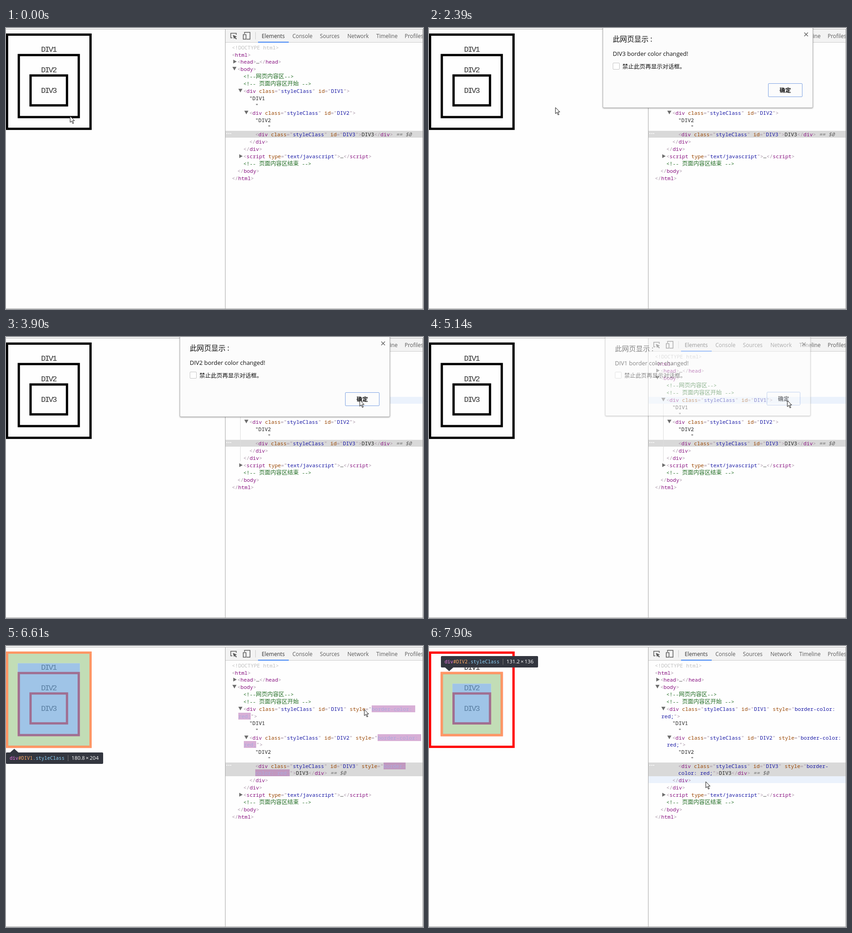
An HTML page that plays this animation: 910x615 px, repeating every 8000 ms.

```html
<!DOCTYPE html>
<html lang="zh-CN">
<head>
<meta charset="utf-8">
<style>
  html, body { margin: 0; width: 100%; height: 100%; overflow: hidden; background: #fefefe; }
  #stage { position: relative; width: 910px; height: 615px; overflow: hidden; }
  #stage div, #stage svg { position: absolute; box-sizing: border-box; }
  .ui { font: 11.7px/16px "Open Sans", "Noto Sans CJK SC", sans-serif; white-space: pre; }

  /* Page */
  #page rect { fill: none; }
  #page .edge { stroke: var(--edge); }
  #page .border { stroke: rgba(255, 229, 153, .66); }
  #page .padding { stroke: rgba(147, 196, 125, .55); }
  #page .content { fill: rgba(111, 168, 220, .66); }
  .label { left: 76.5px; font: 17px/18px "Liberation Mono", monospace; letter-spacing: -1.95px; color: #333; }
  #tip { width: 212px; height: 25px; border-radius: 2px; background: #33363f; color: #fff; }
  #tip .path { left: 8px; top: 4px; font: 10.5px/16px "Noto Sans Mono", monospace; white-space: pre; color: #ee78e6; }
  #tip .path b { font-weight: 400; color: #ffab66; }
  #tip .path i { font-style: normal; color: #8ed3fb; }
  #tip .bar { left: 135px; top: 6px; width: 1px; height: 13px; background: #777; }
  #tip .size { left: 143px; top: 4px; font-size: 11.4px; }
  #tip .size span { padding: 0 2px; }
  #notch { left: 9px; width: 18px; height: 8px; background: #33363f; }
  .above #notch { top: 25px; clip-path: polygon(0 0, 100% 0, 50% 100%); }
  .below #notch { top: -8px; clip-path: polygon(50% 0, 100% 100%, 0 100%); }

  /* Inspector */
  #bar { left: 479px; top: 3px; width: 431px; height: 29px; background: #f3f3f3; border-bottom: 1px solid #ccc; }
  .tab { top: 9px; color: #5a5a5a; }
  .tab.on { color: #333; }
  .row { left: 479px; width: 430px; }
  #hover { background: #ebf2fc; }
  #pick { background: #d9d9d9; }
  #dots { left: 1px; top: -1px; font: bold 11px/15px "DejaVu Sans", sans-serif; color: #fff; }
  #guide { left: 511px; top: 146px; width: 1px; height: 126px; background: #ddd; }
  .line { height: 16px; font: 11.38px/16px "Noto Sans Mono", monospace; white-space: pre; color: #222; }
  .line.down::before, .line.right::before { content: ""; position: absolute; background: #6e6e6e; }
  .line.down::before { left: -11px; top: 3px; width: 9px; height: 8px; clip-path: polygon(0 0, 100% 0, 50% 100%); }
  .line.right::before { left: -9.5px; top: 3px; width: 8px; height: 9px; clip-path: polygon(0 0, 100% 50%, 0 100%); }
  .b { color: #a894a6; } .n { color: #881280; } .k { color: #994500; } .v { color: #1a1aa6; }
  .c { color: #236e25; } .d { color: #c0c0c0; } .e { color: #666; font-style: italic; }
  .zh { font: 12.4px/1 "Noto Sans CJK SC", sans-serif; }
  .m { background: var(--flash); color: var(--ink); }

  /* Dialog */
  #dialog {
    left: 379px; top: -4px; width: 459px; height: 179px; color: #111;
    background: #fcfcfc; border: 1px solid #b4b4b4; border-radius: 3px; box-shadow: 0 1px 3px rgba(0, 0, 0, .35);
  }
  #title { left: 21px; top: 15px; font-size: 15.6px; line-height: 24px; }
  #title span { padding-left: 4px; }
  #msg { left: 21px; top: 51px; font-size: 12.95px; }
  #check { left: 21px; top: 79px; width: 15px; height: 15px; border: 1px solid #c4c4c4; border-radius: 2px; background: #fff; }
  #mute { left: 42px; top: 79px; font: 12.5px/16px "Noto Sans CJK SC", sans-serif; }
  #ok {
    left: 360px; top: 124px; width: 75px; height: 30px; border: 1px solid #7ea3e3; border-radius: 2px;
    font: bold 12.4px/29px "Noto Sans CJK SC", sans-serif; text-align: center;
  }
</style>
</head>
<body>
<div id="stage">
  <svg id="page" style="left:0;top:0" width="240" height="240">
    <g transform="translate(-.2 12) scale(1.035)"><g id="boxes"></g></g>
  </svg>
  <div class="label" style="top:39px">DIV1</div>
  <div class="label" style="top:84px">DIV2</div>
  <div class="label" style="top:129px">DIV3</div>
  <svg id="page" style="left:0;top:0" width="240" height="240">
    <g transform="translate(-.2 12) scale(1.035)"><g id="overlay"></g></g>
  </svg>
  <div id="tip">
    <div id="notch"></div>
    <div class="path">div<b id="tipId"></b><i>.styleClass</i></div>
    <div class="bar"></div>
    <div class="size ui" id="tipSize"></div>
  </div>

  <div id="bar"></div>
  <svg style="left:486px;top:6px" width="62" height="24" fill="none" stroke="#5a5a5a" stroke-width="1.5">
    <path d="M8 15.500H4.500V5.500H16.500V9"/>
    <path d="M9 9l9 4-3.600 1.200 3.400 3.400-1.500 1.500-3.400-3.400L11.500 18z" fill="#5a5a5a" stroke="none"/>
    <path d="M34.500 7V3.500H46.500V18.500H39"/>
    <rect x="31.700" y="8.500" width="6" height="10"/>
    <path d="M58.500 3V19" stroke="#ccc" stroke-width="1"/>
  </svg>
  <div style="left:550px;top:30px;width:67px;height:2px;background:#4285f4"></div>
  <div id="tabs"></div>
  <div class="row" id="hover"></div>
  <div class="row" id="pick"><div id="dots">···</div></div>
  <div id="guide"></div>
  <div id="before"></div>
  <div id="after"></div>

  <div style="left:0;top:2px;width:910px;height:1px;background:#b0b0b0"></div>
  <div style="left:478px;top:3px;width:1px;height:612px;background:#a6a6a6"></div>
  <div style="left:0;top:614px;width:910px;height:1px;background:#a0a0a0"></div>
  <div style="left:909px;top:3px;width:1px;height:612px;background:#a0a0a0"></div>

  <div id="dialog" class="ui">
    <div id="title">此网页显示<span>:</span></div>
    <svg style="left:438px;top:12px" width="10" height="10" stroke="#666" stroke-width="1.500"><path d="M1 1l8 8M9 1l-8 8"/></svg>
    <div id="msg"></div>
    <div id="check"></div>
    <div id="mute">禁止此页再显示对话框。</div>
    <div id="ok">确定</div>
  </div>
  <svg id="cursor" style="left:-1px;top:-1px" width="14" height="20">
    <path d="M1 1V14.500L4.200 11.600L6.600 17.200L8.700 16.300L6.300 10.800H10.500Z" fill="#fff" stroke="#111"/>
  </svg>
</div>
<script>
const $ = id => document.getElementById(id);
const LOOP = 8000;

// Nested page boxes, in CSS pixels before the page zoom
const ZOOM = 1.035, BORDER = 4.8, PADDING = 20, TEXT = 18.4;
const INSET = BORDER + PADDING;
const boxOf = i => ({ x: INSET * i, y: (INSET + TEXT) * i, w: 180.8 - 2 * INSET * i, h: 204 - 68 * i });

function ring(i, inset, band, cls) {
  const { x, y, w, h } = boxOf(i), d = inset + band / 2;
  return `<rect class="${cls}" x="${x + d}" y="${y + d}" width="${w - 2 * d}" height="${h - 2 * d}" stroke-width="${band}"/>`;
}

$('boxes').innerHTML = [0, 1, 2].map(i => ring(i, 0, BORDER, 'edge')).join('');

// Markup helpers for the element tree
const s = (cls, text) => `<span class="${cls}">${text}</span>`;
const attr = (k, v) => ' ' + s('k', k) + s('b', '="') + s('v', v) + s('b', '"');
const head = (name, attrs = '') => s('b', '&lt;') + s('n', name) + attrs;
const open = (name, attrs) => head(name, attrs) + s('b', '&gt;');
const close = name => s('b', '&lt;/') + s('n', name) + s('b', '&gt;');
const note = (text, gap = ' ') => s('c', `&lt;!--${gap}${s('zh', text)}${gap}--&gt;`);
const ids = n => attr('class', 'styleClass') + attr('id', 'DIV' + n);
const styled = (n, value) => head('div', ids(n)) + ' ' + s('k', 'style') + s('b', '="') + s('m', value);
const styledEnd = value => s('m', value) + s('b', '"&gt;');
const tail = 'DIV3' + close('div') + s('e', ' == $0');

function build(host, lines) {
  host.innerHTML = lines.map(([x, y, html, cls = '']) =>
    `<div class="line ${cls}" style="left:${x}px;top:${y - 8}px">${html}</div>`).join('');
}

const opening = [
  [493, 43, s('d', '&lt;!DOCTYPE html&gt;')],
  [493, 58.5, open('html')],
  [505, 74, open('head') + '…' + close('head'), 'right'],
  [505, 90, open('body'), 'down'],
  [518, 106, note('网页内容区', '')],
  [518, 122, note('页面内容区开始')]
];
const ending = y => [
  [531, y, close('div')],
  [518, y + 16.5, close('div')],
  [518, y + 32.5, open('script', attr('type', 'text/javascript')) + '…' + close('script'), 'right'],
  [518, y + 48, note('页面内容区结束')],
  [505, y + 64, close('body')],
  [493, y + 80.5, close('html')]
];

build($('before'), [...opening,
  [518, 138, open('div', ids(1)), 'down'],
  [531, 154, '"DIV1'], [544, 170, '"'],
  [531, 186, open('div', ids(2)), 'down'],
  [544, 201.5, '"DIV2'], [571, 217, '"'],
  [544, 232.5, open('div', ids(3)) + tail],
  ...ending(248.5)]);

build($('after'), [...opening,
  [518, 138, styled(1, 'border-color: '), 'down'], [507, 153.5, styledEnd('red;')],
  [531, 169, '"DIV1'], [544, 184.5, '"'],
  [531, 201, styled(2, 'border-color: '), 'down'], [519, 216, styledEnd('red;')],
  [544, 231.5, '"DIV2'], [571, 247, '"'],
  [544, 262.5, styled(3, 'border-')], [544, 277.5, styledEnd('color: red;') + tail],
  ...ending(293.5)]);

$('tabs').innerHTML = [[558, 'Elements'], [625, 'Console'], [685, 'Sources'], [745, 'Network'], [808, 'Timeline'], [870, 'Profiles']]
  .map(([x, name], i) => `<div class="tab ui${i ? '' : ' on'}" style="left:${x}px">${name}</div>`).join('');

const ticks = [0, 150, 285, 420, 555, 690, 1440, 1575, 1710, 1850, 1985, 2120, 2255, 2390,
  2540, 2680, 2820, 2960, 3095, 3230, 3365, 3500, 3650, 3780, 3900, 4020, 4170, 4360, 4560,
  4720, 4860, 5000, 5140, 5290, 6040, 6190, 6340, 6480, 6610, 6760, 6920, 7070,
  7220, 7356, 7492, 7628, 7764, 7900];
const path = [[0, 140, 193], [690, 88, 136], [1575, 88, 136], [2390, 276, 174], [2540, 258, 172],
  [3095, 772, 138], [3900, 772, 138], [4560, 782, 139], [7070, 782, 139], [7764, 612, 302], [7900, 604, 297]];
// time, opacity, number in the message
const alerts = [[0, 0, 3], [1440, .5, 3], [1575, 1, 3], [3365, .4, 3], [3500, 0, 3], [3650, .5, 2], [3780, 1, 2],
  [4860, .4, 2], [5000, 0, 2], [5140, .5, 1], [5290, 1, 1], [6190, .4, 1], [6340, 0, 1]];
// time, highlighted box, row top, row height
const hovers = [[0, 0, 0, 0], [3365, 0, 131, 15], [6340, 1, 0, 0], [7220, 1, 161, 32], [7356, 2, 193, 31],
  [7492, 2, 224, 31], [7628, 3, 0, 0], [7764, 2, 285, 15]];
const presses = [3230, 4720, 6040];
const UPDATED = 6340, FADED = 7070;

const last = (list, t) => list.findLast(item => item[0] <= t);

function cursorAt(t) {
  const i = path.findLastIndex(p => p[0] <= t);
  const [t0, x0, y0] = path[i], [t1, x1, y1] = path[i + 1] || [LOOP, x0, y0];
  const p = (t - t0) / (t1 - t0);
  return [x0 + (x1 - x0) * p, y0 + (y1 - y0) * p].map(Math.round);
}

function placeRow(el, top, height) {
  el.style.top = top + 'px';
  el.style.height = height + 'px';
}

const show = (el, on) => { el.style.visibility = on ? 'visible' : 'hidden'; };

function inspect(i) {
  const { x, y, w, h } = boxOf(i), below = i === 0;
  $('overlay').innerHTML = ring(i, 0, BORDER, 'border') + ring(i, BORDER, PADDING, 'padding') + ring(i, INSET, 0, 'content');
  $('tip').className = below ? 'below' : 'above';
  $('tip').style.left = (below ? 0 : Math.floor(x * ZOOM) + 1) + 'px';
  $('tip').style.top = Math.floor(below ? h * ZOOM + 22 : y * ZOOM - 22.5) + 'px';
  $('tipId').textContent = '#DIV' + (i + 1);
  $('tipSize').innerHTML = [w, h].map(v => Math.round(v * 10) / 10).join('<span>×</span>');
}

function render(now) {
  const t = ticks.findLast(k => k <= now);
  const updated = t >= UPDATED;
  const [x, y] = cursorAt(t);
  $('cursor').style.transform = `translate(${x}px, ${y}px)`;

  const [, alpha, num] = last(alerts, t);
  const dialog = $('dialog');
  dialog.style.opacity = alpha;
  dialog.style.transform = `scale(${1 - (1 - alpha) * .045})`;
  $('msg').textContent = `DIV${num} border color changed!`;
  $('ok').style.background = presses.some(p => t >= p && t < p + 135) ? '#e4e4e4' : 'transparent';

  show($('before'), !updated);
  show($('after'), updated);
  placeRow($('pick'), updated ? 255 : 225, updated ? 30 : 15);

  const [, target, rowTop, rowH] = last(hovers, t);
  placeRow($('hover'), rowTop, rowH);
  show($('guide'), !updated && rowH);
  show($('overlay'), target);
  show($('tip'), target);
  if (target) inspect(target - 1);

  const glow = updated ? Math.max(0, (FADED - t) / (FADED - UPDATED)) ** 2 : 0;
  const ink = [26, 26, 166].map(v => Math.round(v + (255 - v) * glow ** .5));
  const css = $('stage').style;
  css.setProperty('--edge', updated ? '#f00' : '#000');
  css.setProperty('--flash', `rgba(158, 54, 153, ${glow})`);
  css.setProperty('--ink', `rgb(${ink})`);
}

const start = performance.now();
function frame() {
  render((performance.now() - start) % LOOP);
  requestAnimationFrame(frame);
}
frame();
</script>
</body>
</html>
```
